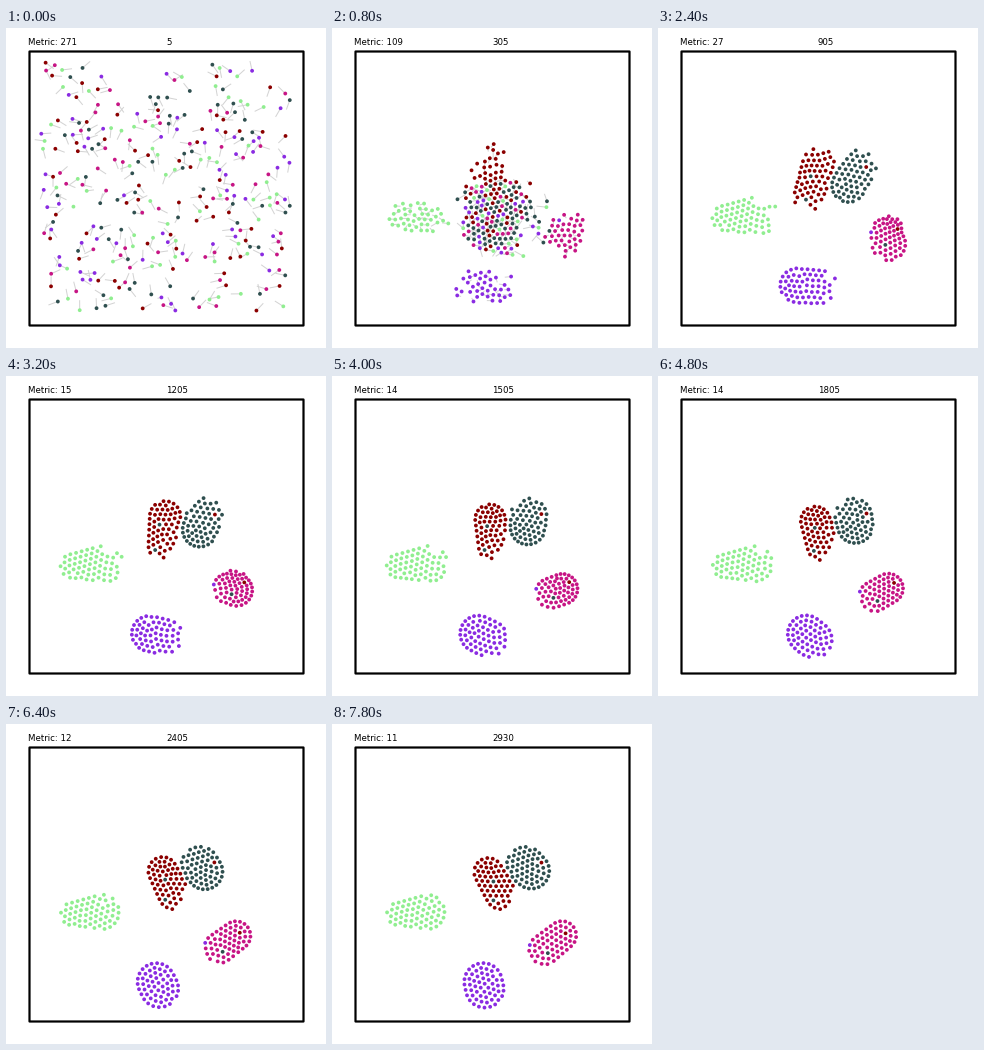
Animation, 320 px wide and 320 px high, one loop 8 s. Source, as a matplotlib script:

```python
import numpy as np
import matplotlib.pyplot as plt
from matplotlib.animation import FuncAnimation
from matplotlib.collections import LineCollection

SIZE, DPI = 320, 100
FRAMES, INTERVAL = 40, 200
PER_GROUP = 60
PX = 72 / DPI
MIXED, SORTED = 4, 8  # frames where the groups are intermingled, then apart
REACH = 5.9           # distance kept between dots

rng = np.random.default_rng(12)

COLORS = ["darkred", "darkslategray", "lightgreen", "mediumvioletred", "blueviolet"]
WANDER = [0.45, 1, 0.2, 0.45, 0.5]  # share of each group in the middle when mixed

# A home is the hull of two discs (x, y, radius): first when sorted, then at the end
EARLY = np.array([
    [(163, 130, 17), (147, 168, 20)],
    [(205, 137, 16), (186, 163, 16)],
    [(67, 190, 13), (103, 187, 20)],
    [(236, 195, 15), (231, 218, 18)],
    [(133, 257, 16), (168, 258, 17)],
], float)
LATE = np.array([
    [(156, 149, 14), (170, 170, 15)],
    [(193, 142, 19), (200, 146, 18)],
    [(66, 190, 11), (95, 188, 17)],
    [(211, 227, 15), (230, 211, 14)],
    [(152, 258, 19), (152, 265, 19)],
], float)
MIDDLE = np.array([(148, 189, 31), (192, 191, 38)], float)
GUESTS = [(0, 1), (0, 1), (1, 0), (3, 0), (3, 1), (3, 4)]  # (home, colour)

group = np.repeat(np.arange(5), PER_GROUP)
N = len(group)


def homes(k):
    """Two discs per dot at frame k, drifting quickly at first, then slowly."""
    u = 1 - np.exp(-max(0, k - SORTED) / 10)
    return ((1 - u) * EARLY + u * LATE)[group]


def fill(discs):
    """One random point inside each pair of discs."""
    u = rng.random((len(discs), 1))
    p = (1 - u) * discs[:, 0] + u * discs[:, 1]
    angle = rng.uniform(0, 2 * np.pi, len(p))
    r = p[:, 2] * np.sqrt(rng.random(len(p)))
    return p[:, :2] + r[:, None] * np.c_[np.cos(angle), np.sin(angle)]


def pull_in(pos, discs, step=1.0):
    """Move dots outside their home towards its axis."""
    a, axis = discs[:, 0], discs[:, 1] - discs[:, 0]
    line = axis[:, :2]
    u = ((pos - a[:, :2]) * line).sum(1) / (line ** 2).sum(1)
    foot = a + np.clip(u, 0, 1)[:, None] * axis
    gap = foot[:, :2] - pos
    dist = np.hypot(*gap.T) + 1e-6
    move = np.clip(dist - foot[:, 2], 0, step)
    pos += gap * (move / dist)[:, None]


def push_apart(pos, reach):
    diff = pos[:, None] - pos[None]
    dist = np.sqrt((diff ** 2).sum(2)) + 1e-6
    force = np.clip(reach - dist, 0, None) / dist * 0.3
    np.fill_diagonal(force, 0)
    pos += np.clip((diff * force[..., None]).sum(1), -1.5, 1.5)


def relax(pos, discs, rounds):
    for _ in range(rounds):
        push_apart(pos, REACH)
        pull_in(pos, discs)


def scatter_start(near):
    """Even scatter over the box; each group keeps its left-to-right order."""
    pos = rng.uniform(34, 283, (N, 2))
    for _ in range(6):
        push_apart(pos, 8)
    for g in range(5):
        part = group == g
        rank = np.argsort(np.argsort(near[part, 0]))
        mine = pos[part]
        pos[part] = mine[np.argsort(mine[:, 0])][rank]
    return np.clip(pos, 33, 284)


def build():
    wanders = rng.random(N) < np.array(WANDER)[group]
    discs = np.where(wanders[:, None, None], MIDDLE, homes(MIXED))
    mixed = fill(discs)
    relax(mixed, discs, 40)
    start = scatter_start(mixed)

    track = np.zeros((FRAMES, N, 2))
    for k in range(MIXED):
        u = 1 - (1 - k / MIXED) ** 1.6
        track[k] = (1 - u) * start + u * mixed

    # every dot leaves the mixed stage for its home; a few arrive late
    home = fill(homes(MIXED))
    relax(home, homes(MIXED), 40)
    travel = 3 + rng.exponential(0.6, N)
    for k in range(MIXED, FRAMES):
        u = np.clip((k - MIXED) / travel, 0, 1)[:, None]
        u = u * u * (3 - 2 * u)
        track[k] = (1 - u) * mixed + u * home
        home += rng.normal(0, 0.25, home.shape)
        relax(home, homes(k + 1), 10)
    return track


def headings(track):
    """Short line ahead of every dot that is on the move."""
    tips = np.zeros_like(track)
    for k in range(FRAMES - 1):
        step = track[k + 1] - track[k]
        speed = np.hypot(*step.T)
        turn = rng.normal(0, max(0.2, 1.2 - 0.25 * k), N)
        angle = np.arctan2(step[:, 1], step[:, 0]) + turn
        size = np.where(speed > 3.5, np.clip(speed * 0.8, 4, 10), 0)
        tips[k] = size[:, None] * np.c_[np.cos(angle), np.sin(angle)]
    return tips


track = build()
tips = headings(track)

tint = group.copy()
for i, (host, color) in enumerate(GUESTS):
    tint[host * PER_GROUP + 7 * i] = color

fig = plt.figure(figsize=(SIZE / DPI, SIZE / DPI), dpi=DPI, facecolor="white")
ax = fig.add_axes([0, 0, 1, 1])
ax.set_xlim(0, SIZE)
ax.set_ylim(SIZE, 0)
ax.axis("off")

ax.add_patch(plt.Rectangle((23.5, 23.5), 274, 274, fill=False, ec="black",
                           lw=2.2 * PX, joinstyle="round", snap=False, zorder=4))
lines = LineCollection([], colors="lightgray", linewidths=PX, zorder=1)
ax.add_collection(lines)
dots = ax.scatter(*track[0].T, s=(3.8 * PX) ** 2, c=[COLORS[t] for t in tint],
                  linewidths=0, zorder=2)
style = dict(family="DejaVu Sans", size=8.7 * PX, color="black", va="baseline")
metric = ax.text(22.5, 17, "", **style)
counter = ax.text(160, 17, "", **style)


def score(k):
    """Steep fall that levels off, read through a few values."""
    known = np.log([271, 109, 48, 15, 14, 12, 11])
    return round(np.exp(np.interp(k, [0, 4, 8, 16, 24, 32, 39], known)))


def draw(k):
    metric.set_text(f"Metric: {score(k)}")
    counter.set_text(str(5 + 75 * k))
    dots.set_offsets(track[k])
    moving = np.abs(tips[k]).sum(1) > 0
    lines.set_segments(np.stack([track[k], track[k] + tips[k]], 1)[moving])
    return lines, dots, metric, counter


anim = FuncAnimation(fig, draw, frames=FRAMES, interval=INTERVAL,
                     repeat=True, repeat_delay=0)
plt.show()
```
